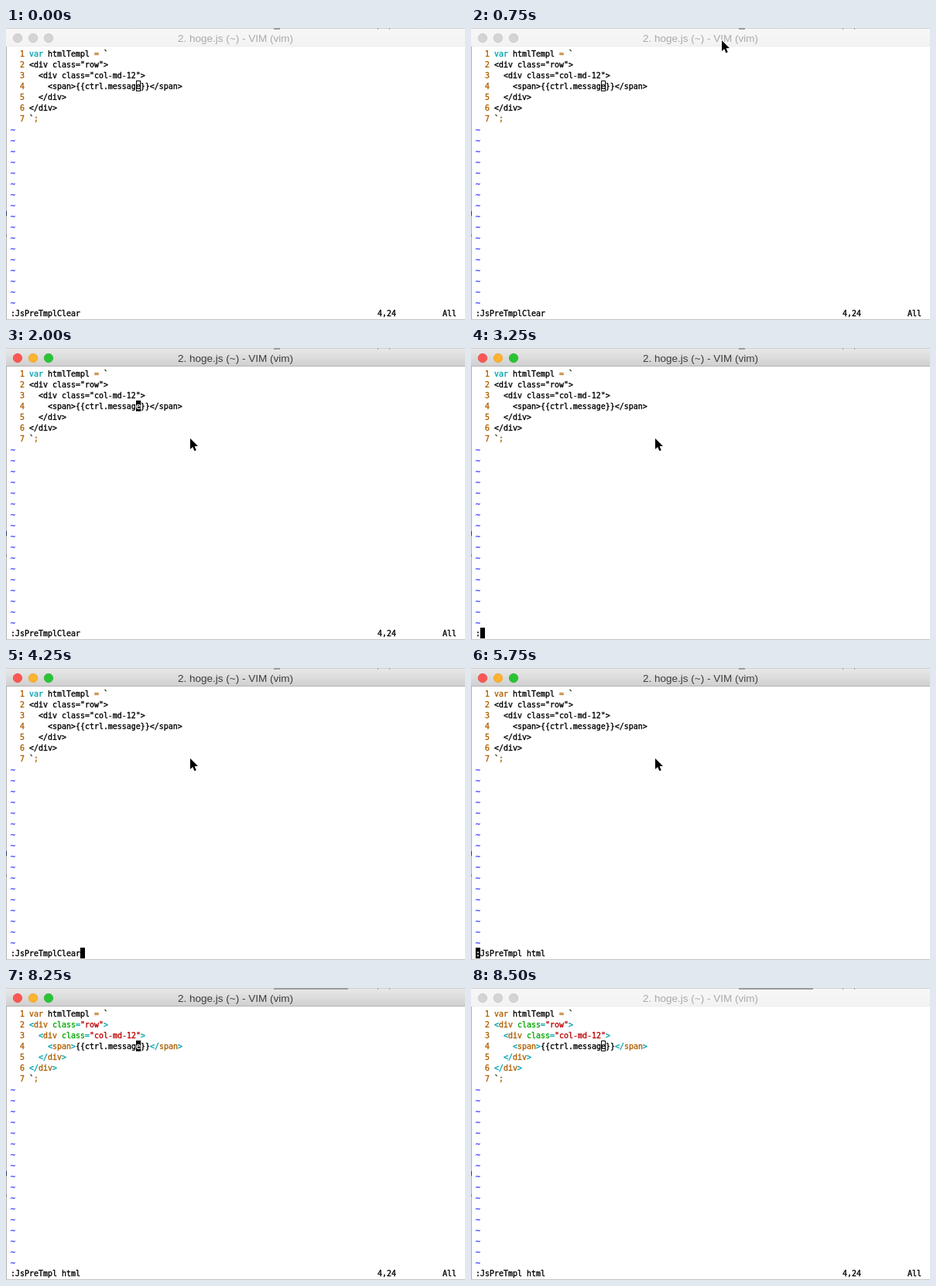
Write an HTML page with a canvas that moves like this. It is 593 px wide and 378 px high and loops after 9.25 s.

```html
<!DOCTYPE html>
<html lang="en">
<head>
<meta charset="utf-8">
<title>Template highlighting</title>
<style>
html, body { margin: 0; width: 100%; height: 100%; overflow: hidden; background: #fff; }
canvas { display: block; width: 593px; height: 378px; }
</style>
</head>
<body>
<canvas id="stage"></canvas>
<script>
const W = 593, H = 378, LOOP = 9250;
const CELL = 6, ROW = 14, LEFT = 6, TOP = 26, CMD_ROW = 24;
const MONO = '9.966px "DejaVu Sans Mono", monospace';
const SANS = '13.5px "Liberation Sans", Arial, sans-serif';

const INK = { k: '#000', n: '#af5f00', t: '#00a3b0', g: '#00a800', r: '#c00000', b: '#4040ff' };

const canvas = document.getElementById('stage');
const ctx = canvas.getContext('2d');
const scale = window.devicePixelRatio || 1;
canvas.width = W * scale;
canvas.height = H * scale;

// Each line is a list of [ink, text] runs.
const plainCode = [
  [['t', 'var'], ['k', ' htmlTempl '], ['n', '='], ['k', ' `']],
  [['k', '<div class="row">']],
  [['k', '  <div class="col-md-12">']],
  [['k', '    <span>{{ctrl.message}}</span>']],
  [['k', '  </div>']],
  [['k', '</div>']],
  [['k', '`'], ['n', ';']]
];

const openDiv = (indent, name) => [
  ['t', indent + '<'], ['n', 'div '], ['g', 'class'], ['t', '='], ['r', `"${name}"`], ['t', '>']
];
const closeTag = (indent, tag) => [['t', indent + '</'], ['n', tag], ['t', '>']];

const richCode = [
  [['n', 'var'], ['k', ' htmlTempl '], ['n', '='], ['k', ' `']],
  openDiv('', 'row'),
  openDiv('  ', 'col-md-12'),
  [['t', '    <'], ['n', 'span'], ['t', '>'], ['k', '{{ctrl.message}}'], ...closeTag('', 'span')],
  closeTag('  ', 'div'),
  closeTag('', 'div'),
  plainCode[6]
];

// [start time, tip x, tip y]; a missing position hides the pointer.
const pointerStops = [
  [0], [500, 328, 12], [750, 324, 16], [1500, 287, 56],
  [1750, 238, 117], [7500, 341, 58], [7750]
];

const commands = [
  [0, ':JsPreTmplClear'], [3250, ':'], [4250, ':JsPreTmplClear'], [5000, ':JsPreTmpl html']
];

const latest = (steps, t) => steps.filter(step => step[0] <= t).pop();

function rect(color, x, y, w, h) {
  ctx.fillStyle = color;
  ctx.fillRect(x, y, w, h);
}

// A hairline outline gives the terminal face its firm weight.
function put(text, col, row, color) {
  const x = LEFT + col * CELL, y = TOP + row * ROW + 11;
  ctx.font = MONO;
  ctx.textAlign = 'left';
  ctx.fillStyle = ctx.strokeStyle = color;
  ctx.lineWidth = 0.35;
  ctx.fillText(text, x, y);
  ctx.strokeText(text, x, y);
}

function putRuns(runs, row) {
  let col = 4;
  for (const [ink, text] of runs) {
    put(text, col, row, INK[ink]);
    col += text.length;
  }
}

function block(col, row, char = '') {
  rect('#000', LEFT + col * CELL, TOP + row * ROW, CELL, ROW);
  put(char, col, row, '#fff');
}

function light(x, fill, edge) {
  ctx.beginPath();
  ctx.arc(x, 13, 5.7, 0, Math.PI * 2);
  ctx.fillStyle = fill;
  ctx.fill();
  ctx.strokeStyle = edge;
  ctx.lineWidth = 0.7;
  ctx.stroke();
}

function drawTitle(active, t) {
  const bar = ctx.createLinearGradient(0, 0, 0, 23);
  bar.addColorStop(0, active ? '#e9e9e9' : '#f7f7f7');
  bar.addColorStop(1, active ? '#d0d0d0' : '#f3f3f3');
  rect(bar, 0, 0, W, 23);
  rect(active ? '#b4b4b4' : '#ececec', 0, 23, W, 1);

  rect('#d0d0d0', 0, 0, W, 1);
  rect('#9c9c9c', 346, 0, t < 6750 ? 8 : 96, 2);
  rect('#9c9c9c', 480, 0, 1, 2);
  rect('#9c9c9c', 495, 0, 1, 2);

  if (active) {
    light(15, '#fc5753', '#df4744');
    light(35, '#fdb32e', '#de9f34');
    light(55, '#2ac532', '#27aa35');
  } else {
    for (const x of [15, 35, 55]) light(x, '#d4d4d4', '#c2c2c2');
  }

  ctx.font = SANS;
  ctx.textAlign = 'center';
  ctx.fillStyle = active ? '#3c3c3c' : '#aaa';
  ctx.fillText('2. hoge.js (~) - VIM (vim)', 296.5, 18);
}

function drawEditor(active, t) {
  for (let i = 0; i < 7; i++) {
    put(String(i + 1), 2, i, INK.n);
    const rich = t >= (i ? 6000 : 5750);
    putRuns((rich ? richCode : plainCode)[i], i);
  }
  for (let row = 7; row < CMD_ROW; row++) put('~', 0, row + 1 / ROW, INK.b);

  const command = latest(commands, t)[1];
  put(command, 0, CMD_ROW, INK.k);

  const typing = t >= 3250 && t < 6000;
  if (typing) {
    if (t < 5750) block(command.length, CMD_ROW);
    else block(0, CMD_ROW, ':');
    return;
  }
  put('4,24', 79, CMD_ROW, INK.k);
  put('All', 93, CMD_ROW, INK.k);
  if (active) {
    block(27, 3, 'e');
  } else {
    ctx.strokeStyle = '#000';
    ctx.lineWidth = 1;
    ctx.strokeRect(LEFT + 27 * CELL + 0.5, TOP + 3 * ROW + 0.5, CELL - 1, ROW - 1);
  }
}

function drawEdges() {
  rect('#b0b0b0', 0, 24, 1, H - 24);
  rect('#26406c', 0, 237, 1, 6);
  rect('#777', 0, 267, 1, 3);
  rect('#c4c4c4', 0, H - 1, W, 1);
}

function drawPointer(x, y) {
  const shape = [[0, 0], [0, 14], [3.2, 11], [5.4, 16.2], [7.8, 15.2], [5.6, 10.2], [10, 10]];
  ctx.beginPath();
  for (const [dx, dy] of shape) ctx.lineTo(x + dx, y + dy);
  ctx.closePath();
  ctx.lineJoin = 'round';
  ctx.lineWidth = 2;
  ctx.strokeStyle = '#fff';
  ctx.stroke();
  ctx.fillStyle = '#000';
  ctx.fill();
}

function draw(t) {
  const active = t >= 1250 && t < 8500;
  ctx.setTransform(scale, 0, 0, scale, 0, 0);
  rect('#fff', 0, 0, W, H);
  drawTitle(active, t);
  drawEditor(active, t);
  drawEdges();
  const [, x, y] = latest(pointerStops, t);
  if (x !== undefined) drawPointer(x, y);
}

const start = performance.now();
function tick() {
  draw((performance.now() - start) % LOOP);
  requestAnimationFrame(tick);
}
tick();
</script>
</body>
</html>
```
